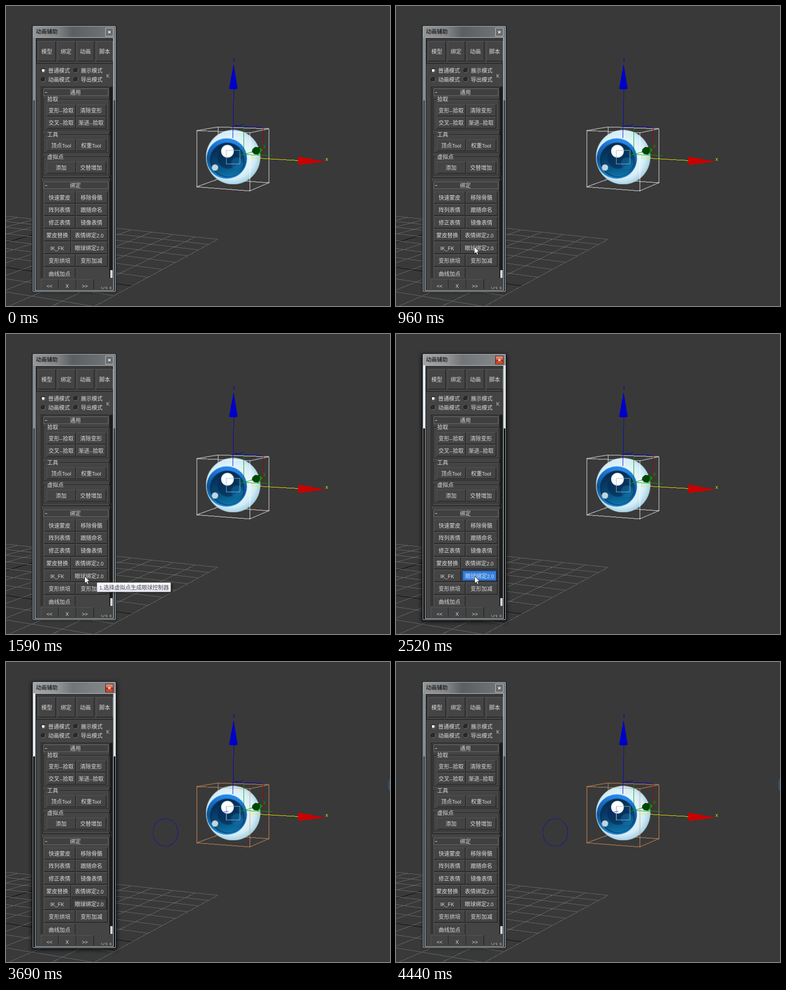
Animation of 847 by 661 pixels, one loop 4.5 s. Source, as an HTML page:

```html
<!DOCTYPE html>
<html lang="zh">
<head>
<meta charset="utf-8">
<title>动画辅助</title>
<style>
html, body { margin: 0; width: 100%; height: 100%; overflow: hidden; background: #393939; }
svg { display: block; width: 847px; height: 661px; }
text { font: 12px "Noto Sans CJK SC", "Noto Sans CJK", sans-serif; fill: #dcdcdc; }
.latin { font: 11px "Liberation Sans", Arial, sans-serif; }
.mid { text-anchor: middle; }
.line { fill: none; stroke-width: 1; }
.crisp { shape-rendering: crispEdges; }
.smooth { shape-rendering: auto; }

.active, .pressed, .focus, .rig, .idle, .tip { animation: 4500ms step-end infinite; }
.active { animation-name: active; }
.pressed { animation-name: pressed; }
.focus { animation-name: focus; }
.rig { animation-name: rig; }
.idle { animation-name: idle; }
.tip { animation-name: tip; animation-timing-function: linear; }
#cursor { animation: cursor 4500ms linear infinite; }

@keyframes active { 0% { opacity: 0 } 55.8% { opacity: 1 } 98.4%, 100% { opacity: 0 } }
@keyframes pressed { 0% { opacity: 0 } 55.8% { opacity: 1 } 62.5%, 100% { opacity: 0 } }
@keyframes focus { 0% { opacity: 0 } 62.5% { opacity: 1 } 97.8%, 100% { opacity: 0 } }
@keyframes rig { 0% { opacity: 0 } 62.5%, 100% { opacity: 1 } }
@keyframes idle { 0% { opacity: 1 } 62.5%, 100% { opacity: 0 } }
@keyframes tip {
  0%, 23.3% { opacity: 0 }
  26.7%, 55.8% { opacity: 1 }
  55.81%, 100% { opacity: 0 }
}
@keyframes cursor {
  0%, 5.9% { transform: translate(870px, 60px) }
  6% { transform: translate(836px, 68px) }
  8.67% { transform: translate(520px, 330px) }
  11.33% { transform: translate(318px, 480px) }
  13.33% { transform: translate(262px, 513px) }
  17.33% { transform: translate(217px, 527px) }
  22% { transform: translate(165px, 530px) }
  24.67% { transform: translate(156px, 530px) }
  29.33% { transform: translate(170px, 532px) }
  30%, 35.2% { transform: translate(172px, 532px) }
  35.3%, 62% { transform: translate(173px, 533px) }
  65.33% { transform: translate(420px, 440px) }
  68.67%, 100% { transform: translate(870px, 300px) }
}
</style>
</head>
<body>
<svg viewBox="0 0 847 661" xmlns="http://www.w3.org/2000/svg">
  <defs>
    <radialGradient id="ball" cx=".47" cy=".47" r=".54">
      <stop offset=".5" stop-color="#e9f8fd"/><stop offset=".8" stop-color="#d3edf7"/><stop offset="1" stop-color="#a5d0e2"/>
    </radialGradient>
    <linearGradient id="ring" x1=".6" y1="0" x2=".4" y2="1">
      <stop offset="0" stop-color="#2a90f2"/><stop offset=".3" stop-color="#1769c2"/><stop offset=".6" stop-color="#0c5590"/><stop offset="1" stop-color="#1b83cc"/>
    </linearGradient>
    <linearGradient id="iris" x1=".4" y1="0" x2=".6" y2="1">
      <stop offset="0" stop-color="#06284c"/><stop offset=".5" stop-color="#09446f"/><stop offset="1" stop-color="#0e75ab"/>
    </linearGradient>
    <linearGradient id="title" x2="1" y2="0">
      <stop offset="0" stop-color="#949698"/><stop offset=".3" stop-color="#808284"/><stop offset=".48" stop-color="#5c5f62"/><stop offset="1" stop-color="#74787b"/>
    </linearGradient>
    <linearGradient id="close" x2="0" y2="1">
      <stop offset="0" stop-color="#e49a86"/><stop offset=".48" stop-color="#cf5a42"/><stop offset=".5" stop-color="#b5290f"/><stop offset="1" stop-color="#d5603c"/>
    </linearGradient>
    <linearGradient id="paper" x2="0" y2="1">
      <stop offset="0" stop-color="#fff"/><stop offset="1" stop-color="#e4e5f0"/>
    </linearGradient>
    <clipPath id="body"><rect x="67" y="71" width="169" height="553"/></clipPath>
    <clipPath id="rolls"><rect x="77" y="178" width="159" height="421"/></clipPath>
  </defs>

  <rect width="847" height="661" fill="#393939"/>
  <g id="grid" class="line crisp"></g>

  <g id="scene" class="line crisp" transform="translate(.5 .5)">
    <g class="idle" stroke="#fff"><path d="M420 274L467 266L579 270V389L467 381V266M420 398L467 381"/></g>
    <g class="rig" stroke="#e39a63"><path d="M420 274L467 266L579 270V389L467 381V266M420 398L467 381"/></g>
    <g class="smooth" stroke="none">
      <circle cx="500.500" cy="332.500" r="60" fill="url(#ball)"/>
      <circle cx="486.500" cy="335.500" r="44.500" fill="url(#ring)"/>
      <circle cx="487.500" cy="338.500" r="38" fill="#073058"/>
      <circle cx="488.500" cy="339.500" r="36" fill="url(#iris)"/>
      <circle cx="489" cy="335" r="23" fill="#052c53" opacity=".65"/>
      <circle cx="509" cy="346" r="13" fill="#1476ae" opacity=".45"/>
      <circle cx="488" cy="319.500" r="14" fill="#fff"/>
      <circle cx="460.500" cy="355.500" r="7" fill="#c3d6e0"/>
    </g>
    <g class="idle" stroke="#fff"><path d="M420 274L537 279V407L420 398ZM537 279L579 270M537 407L579 389"/></g>
    <g class="rig" stroke="#e39a63"><path d="M420 274L537 279V407L420 398ZM537 279L579 270M537 407L579 389"/></g>
    <rect x="485" y="317" width="30" height="30" stroke="#8fbbd3"/>
    <g class="rig">
      <path d="M462 334L490 328" stroke="#1414b4"/>
      <path d="M485 318V348" stroke="#a99be0"/>
      <ellipse cx="351" cy="375" rx="27.500" ry="30.500" stroke="#0c0cc4"/>
      <circle cx="874" cy="270" r="30" stroke="#2f86e4"/>
    </g>
    <path d="M500 291L502 183M501 264L525 261M501 264L567 267" stroke="#0000c8"/>
    <path d="M567 266V326" stroke="#b00000"/>
    <path d="M524 262V327L588 329M516 329L546 320" stroke="#00a000"/>
    <path d="M540 334L645 340" stroke="#f0f000"/>
    <g class="smooth" stroke="none">
      <path d="M501.500 127L491.500 182L501.500 183.500L510.500 182Z" fill="#0000c8"/>
      <path d="M644 331L704 342.500L644 350Z" fill="#c80000"/>
      <path d="M556 311L566 316L558 326Z" fill="#009600"/>
      <path d="M543 315L549 310L558 311L560 318L556 327L547 326L542 321Z" fill="#004600"/>
      <text class="latin mid" x="502.500" y="121" style="fill:#0000d8">z</text>
      <text class="latin mid" x="569.500" y="311" style="fill:#00a800">y</text>
      <text class="latin mid" x="707" y="340" style="fill:#f0f000">x</text>
    </g>
  </g>

  <g id="window" class="crisp">
    <rect x="58" y="45" width="185" height="587" opacity=".4" style="filter:blur(2px)"/>
    <g class="active"><rect x="56" y="45" width="189" height="590" opacity=".65" style="filter:blur(5px)"/></g>
    <rect x="58.500" y="43.500" width="184" height="587" rx="2" fill="#3c4145" stroke="#15181a"/>
    <rect x="60" y="45" width="181" height="24" fill="url(#title)"/>
    <g class="active"><rect x="60" y="45" width="181" height="24" fill="#fff" opacity=".14"/></g>
    <path d="M60 69h5v139h-5zM237 69h5v139h-5z" fill="#7b8185"/>
    <rect x="59.500" y="44.500" width="182" height="585" rx="2" class="line" stroke="#b9c3ca"/>
    <g class="active">
      <path d="M60 69h4v139h-4zM238 69h4v139h-4z" fill="#e6eaec"/>
      <path d="M60 208h4v420h-4zM238 208h3v420h-3z" fill="#0e1012"/>
    </g>
    <rect x="64.500" y="69.500" width="172" height="557" fill="#444" stroke="#e2e7ea"/>
    <rect x="65.500" y="70.500" width="170" height="555" class="line" stroke="#111"/>
    <text x="66" y="61" style="fill:#000">动画辅助</text>
    <rect x="219.500" y="48.500" width="17" height="18" fill="#676c70" stroke="#c3cace"/>
    <g class="active"><rect x="219.500" y="48.500" width="17" height="18" fill="url(#close)" stroke="#3c100a"/></g>
    <path class="smooth" d="M225.500 55l5 5m0-5l-5 5" stroke="#fff" stroke-width="1.600"/>
    <g id="panel" clip-path="url(#body)"></g>
  </g>

  <g class="tip">
    <rect x="204" y="551" width="163" height="20" opacity=".4" style="filter:blur(1.500px)"/>
    <rect x="200.500" y="547.500" width="163" height="21" rx="1.500" fill="url(#paper)" stroke="#767676"/>
    <text x="206" y="563" style="fill:#4c4c58"><tspan class="latin">1.</tspan>选择虚拟点生成眼球控制器</text>
  </g>
  <g id="cursor">
    <path d="M.5 .5V16.500L4.200 13L6.800 18.700L9.300 17.600L6.800 12H11.600Z" fill="#fff" stroke="#111" stroke-width=".9"/>
  </g>
</svg>
<script>
const byId = id => document.getElementById(id);

// Perspective floor: origin plus two vanishing points
function floor(u, v) {
  const a = -0.01766 * u, b = 0.04704 * v, s = 1 + a + b;
  const x = (-126 - 2990 * a + 972 * b) / s;
  const y = (557.4 + 136 * a + 241 * b) / s;
  return x.toFixed(1) + ' ' + y.toFixed(1);
}
let grid = '';
for (let i = -7; i <= 7; i++) {
  const path = `M${floor(i, -7)}L${floor(i, 7)}M${floor(-7, i)}L${floor(7, i)}`;
  grid += `<path d="${path}" stroke="${i ? '#686868' : '#080808'}"/>`;
}
byId('grid').innerHTML = grid;

const mixed = s => s.replace(/[\x20-\x7e]+/g, run =>
  `<tspan class="latin">${run.replace(/</g, '&lt;')}</tspan>`);
const label = (s, x, y, cls = '', style = '') =>
  `<text class="${cls}" x="${x}" y="${y + 4.5}" style="${style}">${mixed(s)}</text>`;
const box = (x1, y1, x2, y2, stroke, fill = 'none') =>
  `<rect x="${x1 + .5}" y="${y1 + .5}" width="${x2 - x1}" height="${y2 - y1}" fill="${fill}" stroke="${stroke}"/>`;

function button(s, x1, x2, y1, y2) {
  return box(x1, y1, x2, y2, '#555', '#444') +
    `<path class="line" d="M${x1} ${y2 + .5}H${x2 + .5}V${y1}" stroke="#141414"/>` +
    label(s, (x1 + x2) / 2, (y1 + y2) / 2 + .5, 'mid');
}
function pair(left, right, y, x1, split, x2) {
  return button(left, x1, split, y, y + 25) +
    (right ? button(right, split + 2, x2, y, y + 25) : '');
}
function group(s, y1, y2, width) {
  return box(84, y1 + 1, 228, y2 + 1, '#585858') + box(83, y1, 227, y2, '#161616') +
    `<rect x="89" y="${y1 - 2}" width="${width}" height="5" fill="#444"/>` + label(s, 91, y1);
}
function header(s, y) {
  return box(83, y, 225, y + 15, '#6c6c6c', '#404040') + label(s, 153, y + 8, 'mid') +
    `<path d="M86 ${y + 8.5}h5" stroke="#ddd"/>`;
}
function radio(s, x, y, on) {
  return `<g class="smooth"><circle cx="${x}" cy="${y}" r="4.5" fill="#2b2b2b" stroke="#0c0c0c"/>` +
    `<path d="M${x - 3} ${y + 4}A5 5 0 0 0 ${x + 4} ${y - 3}" class="line" stroke="#8a8a8a"/>` +
    (on ? `<circle cx="${x}" cy="${y}" r="3.2" fill="#f4f4f4"/>` : '') + '</g>' + label(s, x + 11, y);
}

const tabs = ['模型', '绑定', '动画', '脚本']
  .map((s, i) => button(s, 71 + 42.5 * i, 109 + 42.5 * i, 78, 121)).join('');
const modes = radio('普通模式', 82, 142, true) + radio('展示模式', 154, 142) +
  radio('动画模式', 82, 162) + radio('导出模式', 154, 162);

const common = box(80, 182, 228, 378, '#161616') + header('通用', 182) +
  group('拾取', 205, 273, 28) +
  pair('变形--拾取', '清除变形', 217, 90, 153, 220) +
  pair('交叉--拾取', '渐进--拾取', 244, 90, 153, 220) +
  group('工具', 283, 323, 28) + pair('顶点Tool', '权重Tool', 294, 90, 153, 220) +
  group('虚拟点', 332, 372, 40) + pair('添加', '交替增加', 343, 90, 153, 220);

const rows = [
  ['快速蒙皮', '移除骨骼', 409], ['阵列表情', '跟随命名', 436], ['修正表情', '镜像表情', 464],
  ['蒙皮替换', '表情绑定2.0', 492, 142], ['IK_FK', '眼球绑定2.0', 520, 142],
  ['变形烘培', '变形加减', 548], ['曲线加点', '', 577]
];
const binding = box(80, 387, 228, 640, '#161616') + header('绑定', 387) +
  rows.map(([l, r, y, split = 152]) => pair(l, r, y, 84, split, 223)).join('');

const dots = color => `<rect x="148.500" y="523.500" width="72" height="19" fill="none" stroke="${color}" stroke-dasharray="1 1"/>`;
const states = `<g class="pressed">${box(145, 520, 222, 545, '#161616', '#444')}` +
  box(146, 521, 221, 543, '#1b4f95', '#3a80dc') + dots('#0b2c55') +
  label('眼球绑定2.0', 184.5, 533.5, 'mid', 'fill:#c9e0fa') + '</g>' +
  `<g class="focus">${box(145, 520, 222, 545, '#161616')}${dots('#0c0c0c')}</g>`;

const footer = ['<<', 'X', '>>'].map((s, i) =>
  button(s, 77 + 39 * i, 115 + 39 * i, 602, 630)).join('');

byId('panel').innerHTML = box(67, 74, 240, 126, '#161616') + tabs + modes +
  label('K', 225, 153, 'mid', 'fill:#c4c4c4') +
  `<g clip-path="url(#rolls)">${box(77, 178, 240, 660, '#141414')}${common}${binding}${states}` +
  '<rect x="229" y="178" width="6" height="421" fill="#1c1c1c"/>' +
  '<rect x="230" y="582" width="5" height="17" fill="#d8d8d8"/></g>' +
  '<path d="M232.500 374V384" stroke="#777" stroke-dasharray="1 2"/>' +
  footer + label('V3.51', 210, 622, '', 'fill:#b8b8b8;letter-spacing:.6px');
</script>
</body>
</html>
```
